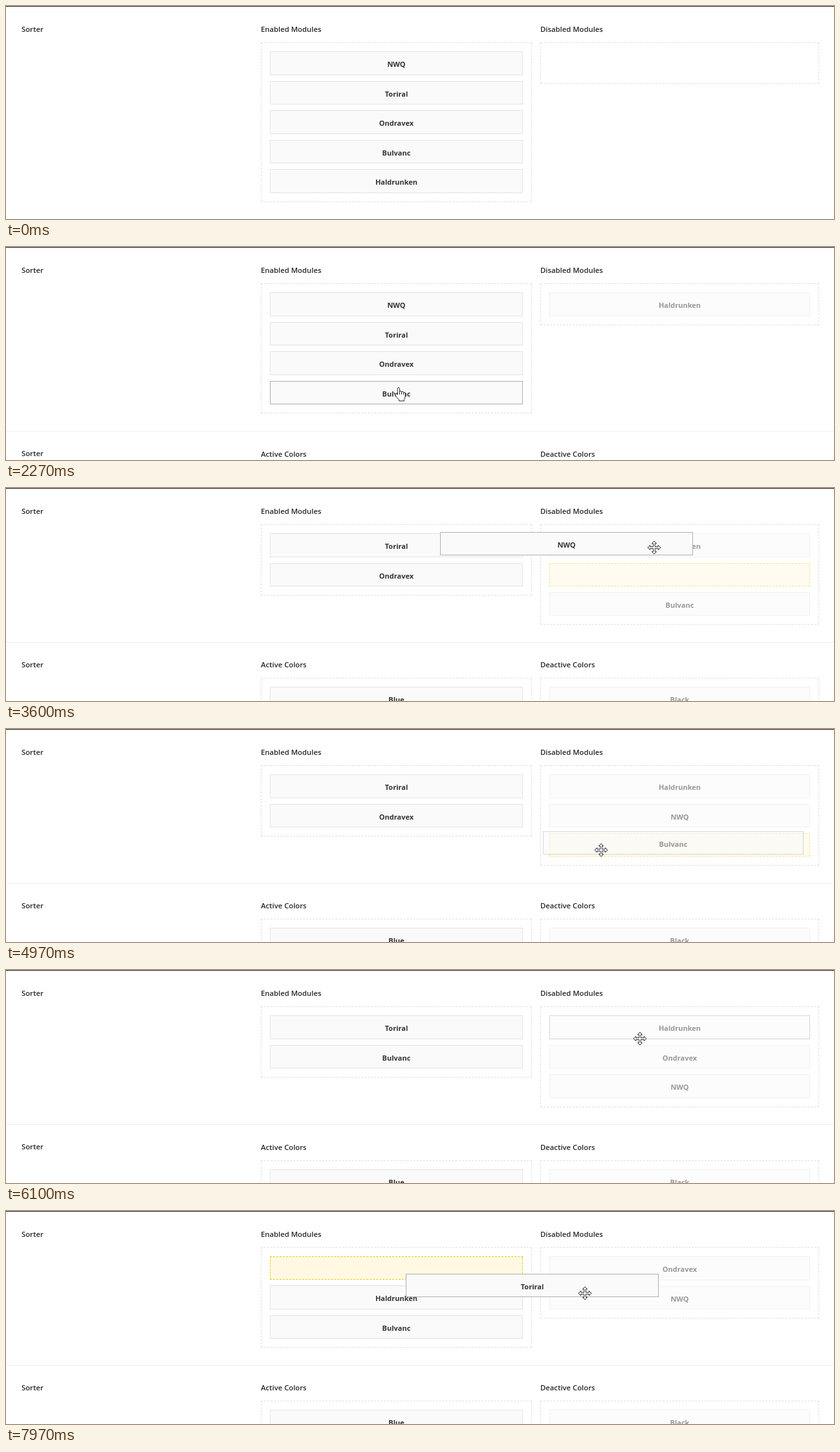
Recreate the animation shown at these times as an HTML page. Size 1280 by 329 pixels, loop 8 s.

```html
<!DOCTYPE html>
<html lang="en">
<head>
<meta charset="utf-8">
<title>Sorter</title>
<style>
html, body { margin: 0; width: 100%; height: 100%; overflow: hidden; background: #fff; }
#stage { position: relative; width: 1280px; height: 329px; overflow: hidden; background: #fff;
  font-family: "Open Sans", "Noto Sans", sans-serif; }
#stage div, #cursor { position: absolute; box-sizing: border-box; white-space: nowrap; }
.rule { left: 0; width: 1280px; height: 1px; background: #eee; }
.rule.top { top: 0; background: #1c1c1c; }
.head { font-size: 11.3px; font-weight: 600; line-height: 16px; color: #23282d; }
.list { border: 1px dashed #dedede; }
.item { border: 1px solid #e3e3e3; background: #fafafa; color: #333;
  font-size: 11px; font-weight: 700; line-height: 37px; text-align: center; }
.slot { border: 1px dashed #ecc816; background: #fff9e3; }
.hover { border-color: #b0b0b0; }
#cursor { left: 0; top: 0; z-index: 3; overflow: visible; }
#cursor path { fill: #fff; stroke: #2a2a36; stroke-linejoin: round; }
</style>
</head>
<body>
<div id="stage">
  <svg id="cursor" width="1" height="1">
    <path id="hand" d="M-1.7 9V-.2a1.6 1.6 0 0 1 3.2 0V5.6V4.9a1.5 1.5 0 0 1 3 .2V6.2V5.6a1.5 1.5 0 0 1 3 .3V7V6.6a1.3 1.3 0 0 1 2.6 .4V12q0 2.6-1.8 4.6V18.8H.6V16.8Q-2.6 14-5.2 9.8C-6 8-4 7-2.8 8.2ZM1.5 5V9M4.5 6V9M7.5 7V9"/>
    <path id="move" d="M0-10L3.6-6.2H1.3V-1.3H6.2V-3.6L10 0L6.2 3.6V1.3H1.3V6.2H3.6L0 10L-3.6 6.2H-1.3V1.3H-6.2V3.6L-10 0L-6.2-3.6V-1.3H-1.3V-6.2H-3.6Z"/>
  </svg>
</div>
<script>
const LOOP = 8000;
const FIRST = 69.9, ITEM_H = 36.6, SLOT_H = 36, GAP = 9;
const HOLD = 135, LIFT = 10;
const COLS = [
  { x: 394, w: 419, ix: 408, iw: 391, alpha: 1 },
  { x: 826, w: 431, ix: 840, iw: 403, alpha: 0.5 }
];
const NAMES = { N: 'NWQ', T: 'Toriral', O: 'Ondravex', B: 'Bulvanc', H: 'Haldrunken' };

// each drag: target column and index, its times, and where it is grabbed and let go
const ENTRY = { drop: 470 - HOLD, end: [600, 345] };
const DRAGS = [
  { item: 'H', col: 1, at: 0, arrive: 830, start: 1000, drop: 1430, grab: [605, 262], end: [1040, 82] },
  { item: 'B', col: 1, at: 1, arrive: 2130, start: 2300, drop: 2710, grab: [607, 219], end: [1040, 134] },
  { item: 'N', col: 1, at: 1, arrive: 3200, start: 3250, drop: 3720, grab: [739, 94], end: [1052, 100] },
  { item: 'B', col: 0, at: 2, arrive: 4670, start: 4930, drop: 5370, grab: [930, 190], end: [520, 182] },
  { item: 'O', col: 1, at: 1, arrive: 5700, start: 5750, drop: 6095, grab: [650, 142], end: [980, 106] },
  { item: 'H', col: 0, at: 1, arrive: 6530, start: 6570, drop: 6970, grab: [1028, 95], end: [652, 121] },
  { item: 'T', col: 0, at: 0, arrive: 7370, start: 7430, drop: LOOP, grab: [685, 100], end: [897, 129] }
];

const stage = document.getElementById('stage');
const hand = document.getElementById('hand');
const move = document.getElementById('move');

function make(cls, text = '') {
  const el = document.createElement('div');
  el.className = cls;
  el.textContent = text;
  stage.appendChild(el);
  return el;
}

// edges snap to whole pixels
function place(el, x, y, w, h, alpha = 1) {
  const top = Math.round(y);
  Object.assign(el.style, {
    left: Math.round(x) + 'px', top: top + 'px', width: w + 'px',
    height: Math.round(y + h) - top + 'px', opacity: alpha
  });
}

function heading(text, x, baseline) {
  const el = make('head', text);
  el.style.left = x + 'px';
  el.style.top = baseline - 12 + 'px';
  return el;
}

make('rule top');
heading('Sorter', 24, 40);
heading('Enabled Modules', 394, 40);
heading('Disabled Modules', 826, 40);
const lists = COLS.map(() => make('list'));

const rule = make('rule');
const label = heading('Sorter', 24, 0);
const lower = ['Active Colors', 'Deactive Colors'].map((text, i) => ({
  head: heading(text, COLS[i].x, 0),
  list: make('list'),
  item: make('item', ['Blue', 'Black'][i])
}));

const slot = make('slot');
const items = {};
for (const key in NAMES) items[key] = make('item', NAMES[key]);

function layout(keysByCol) {
  const spots = {};
  const bottoms = keysByCol.map((keys, col) => {
    let y = FIRST;
    for (const key of keys) {
      const h = key === '*' ? SLOT_H : ITEM_H;
      spots[key] = { col, y, h };
      y += h + GAP;
    }
    return keys ? y + 5.1 : 120;
  });
  return { spots, bottoms };
}

// a drag leaves a slot (*), which changes lists halfway and then takes the item
function buildStates() {
  let keys = ['NTOBH', ''];
  const states = [{ t: 0, ...layout(keys) }];
  for (const drag of DRAGS) {
    const { item, col, at, start, drop } = drag;
    const home = layout(keys).spots[item];
    const lifted = keys.map(k => k.replace(item, '*'));
    const moved = keys.map((k, i) => {
      const rest = k.replace(item, '');
      return i === col ? rest.slice(0, at) + '*' + rest.slice(at) : rest;
    });
    keys = moved.map(k => k.replace('*', item));
    states.push(
      { t: start, drag, home, ...layout(lifted) },
      { t: (start + drop) / 2, drag, home, ...layout(moved) },
      { t: drop, ...layout(keys) });
  }
  return states;
}
const states = buildStates();

function glide(t, t0, t1, a, b, lift = 0) {
  const p = Math.min(1, Math.max(0, (t - t0) / (t1 - t0)));
  const e = p * p * (3 - 2 * p);
  return [a[0] + (b[0] - a[0]) * e, a[1] + (b[1] - a[1]) * e - lift * Math.sin(Math.PI * p)];
}

function pointer(t) {
  const i = DRAGS.findIndex(d => t < d.drop + HOLD);
  const d = DRAGS[i], last = DRAGS[i - 1] || ENTRY;
  return t < d.arrive
    ? glide(t, last.drop + HOLD, d.arrive, last.end, d.grab)
    : glide(t, d.start, d.drop, d.grab, d.end, LIFT);
}

function drawLower(y) {
  rule.style.top = Math.round(y) + 'px';
  label.style.top = Math.round(y) + 27 + 'px';
  lower.forEach(({ head, list, item }, i) => {
    const c = COLS[i];
    head.style.top = Math.round(y + 39.7) - 12 + 'px';
    place(list, c.x, y + 55.6, c.w, 200);
    place(item, c.ix, y + 69.4, c.iw, ITEM_H, c.alpha);
  });
}

function drawDragged({ drag, home, spots }, x, y) {
  const c = COLS[home.col], [gx, gy] = drag.grab;
  const alpha = home.col && spots['*'].col ? 0.5 : 1;
  place(items[drag.item], c.ix + x - gx, Math.round(home.y + y - gy), c.iw, SLOT_H, alpha);
}

function render(t) {
  const state = states.filter(s => s.t <= t).pop();
  const { drag, spots, bottoms } = state;
  const [x, y] = pointer(t);

  lists.forEach((el, i) => place(el, COLS[i].x, 56, COLS[i].w, bottoms[i] - 56));
  drawLower(Math.max(...bottoms) + 26.5);

  let over = null;
  slot.style.display = drag ? '' : 'none';
  for (const key in spots) {
    const s = spots[key], c = COLS[s.col];
    place(key === '*' ? slot : items[key], c.ix, s.y, c.iw, s.h, c.alpha);
    if (x >= c.ix && x < c.ix + c.iw && y >= s.y && y < s.y + s.h) over = key;
  }
  const active = drag ? drag.item : over;
  for (const key in items) {
    items[key].classList.toggle('hover', key === active);
    items[key].style.zIndex = drag && key === active ? 2 : '';
  }
  if (drag) drawDragged(state, x, y);

  // the move cursor lingers after a drop; enabled boxes show the hand
  const busy = drag || (state.t > 0 && t < state.t + HOLD);
  const moving = busy && !(over && spots[over].col === 0);
  hand.style.display = moving ? 'none' : '';
  move.style.display = moving ? '' : 'none';
  const spot = `translate(${Math.round(x)} ${Math.round(y)})`;
  hand.setAttribute('transform', spot);
  move.setAttribute('transform', spot);
}

const began = performance.now();
function tick() {
  render((performance.now() - began) % LOOP);
  requestAnimationFrame(tick);
}
render(0);
requestAnimationFrame(tick);
</script>
</body>
</html>
```
